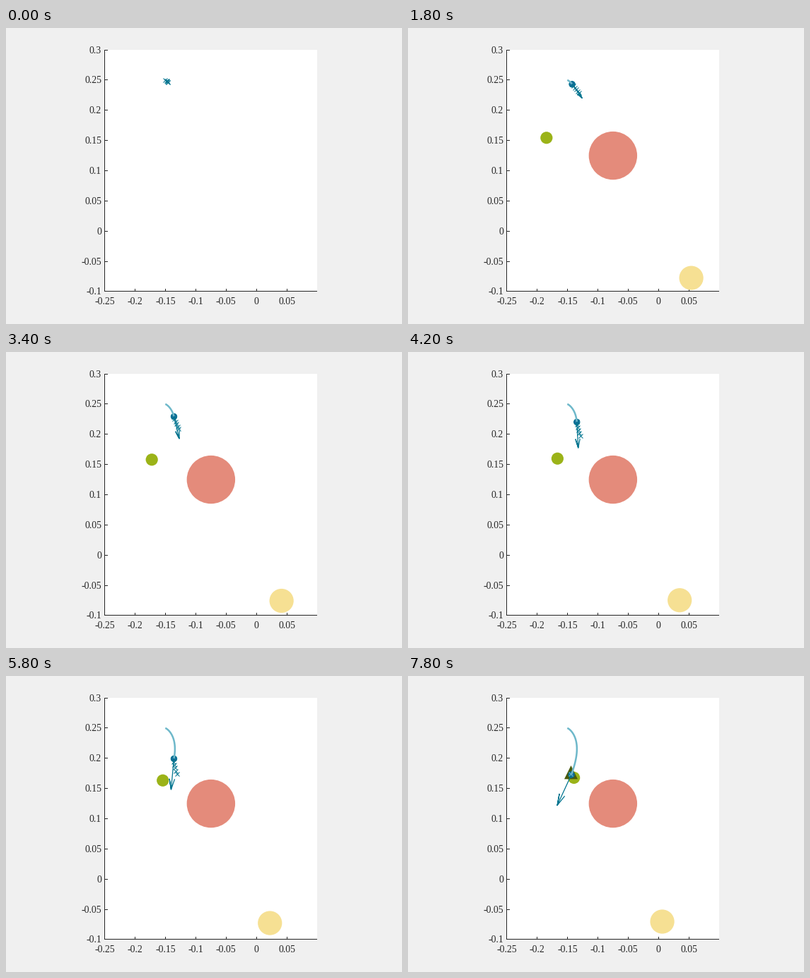
Animation, 560 px wide and 420 px high, one loop 8 s. Source, as a matplotlib script:

```python
import numpy as np
import matplotlib.pyplot as plt
from matplotlib.animation import FuncAnimation
from matplotlib.patches import Circle, Polygon, Rectangle

W, H, DPI = 560, 420, 100
PX = 72 / DPI                      # points per pixel
FRAMES, STEP = 40, 200
X0, Y0, UNIT = 139.8, 374.0, 857.5  # axis corner and pixels per data unit

TEAL, BLUE, TRAIL = "#00748f", "#17699c", "#6eb8ca"
RED, YELLOW, GREEN, OLIVE = "#e48b7b", "#f6e093", "#9bb318", "#4a5a0c"
INK = "#262626"

plt.rcParams["font.family"] = "Liberation Serif"
fig = plt.figure(figsize=(W / DPI, H / DPI), dpi=DPI, facecolor="#f0f0f0")
ax = fig.add_axes([0, 0, 1, 1])
ax.set_xlim(0, W)
ax.set_ylim(H, 0)
ax.axis("off")


def px(x):
    return X0 + (x + 0.25) * UNIT


def py(y):
    return Y0 - (y + 0.1) * UNIT


def box(x, y, w, h, color=INK, z=1):
    ax.add_patch(Rectangle((x, y), w, h, fc=color, ec="none", lw=0, aa=False, zorder=z))


def line(color, width=1.0, **kw):
    return ax.plot([], [], color=color, lw=width * PX, **kw)[0]


def disc(x, y, r, color, z):
    return ax.add_patch(Circle((x, y), r, fc=color, ec="none", zorder=z))


def draw_axes():
    box(139, 31, 301, 343, "white", 0)
    box(139, 31, 1, 343)
    box(139, 373, 301, 1)
    style = dict(size=13.75 * PX, color=INK, va="baseline")
    for i in range(-5, 2):
        x = px(i * 0.05)
        box(int(x), 370, 1, 4)
        ax.text(x, 392, f"{i * 0.05:.4g}", ha="center", **style)
    for i in range(-2, 7):
        y = min(int(py(i * 0.05)), 373)
        box(139, y, 5, 1)
        ax.text(135, y + 5, f"{i * 0.05:.4g}", ha="right", **style)


# Key times and the pixel quantities measured along the run
KEYS = [0, 5, 13, 21, 29, 33, 39]
FIT_X = np.polyfit(KEYS, [225.4, 228.5, 235.5, 238.5, 237.4, 235.4, 231], 4)
FIT_Y = np.polyfit(KEYS, [73.9, 76.1, 85, 99.4, 117.4, 126.8, 140], 4)
ARROW_X = [10, 15, 13, 2, -4, -13, -20]
ARROW_Y = [5, 13, 26, 36.5, 43.5, 43.2, 43.5]
PLAN_X = [4, 10.5, 9, 5, 5, 5, 5]
PLAN_Y = [3.5, 10, 15, 20, 21.5, 22, 22]
LAST_PLAN = 31


def head_at(k):
    return np.polyval(FIT_X, k), np.polyval(FIT_Y, k)


def arrow_at(k):
    return np.interp(k, KEYS, ARROW_X), np.interp(k, KEYS, ARROW_Y)


def plan_at(k):
    """Predicted positions from the head on, leaving along the heading and bending away."""
    hx, hy = head_at(k)
    ux, uy = arrow_at(k)
    ex, ey = np.interp(k, KEYS, PLAN_X), np.interp(k, KEYS, PLAN_Y)
    s = np.linspace(0, 1, 6)
    lead = ux * ey / uy
    return hx + lead * s + (ex - lead) * s**2, hy + ey * s


def arrow_path(k):
    x, y = head_at(k)
    u, v = arrow_at(k)
    tx, ty = x + u, y + v
    back, side = 0.33, 0.0825
    xs = [x, tx, tx - back * u - side * v, tx, tx - back * u + side * v]
    ys = [y, ty, ty - back * v + side * u, ty, ty - back * v - side * u]
    return xs, ys


draw_axes()
red = disc(px(-0.075), py(0.125), 34.2, RED, 2)
yellow = disc(0, 0, 17.1, YELLOW, 2)
green = disc(0, 0, 8.6, GREEN, 2)
alert = ax.add_patch(Polygon([(230.5, 127), (240, 146.3), (221, 146.3)],
                             fc=OLIVE, ec="none", zorder=3))
head = ax.add_patch(Circle((0, 0), 4.2, fc=BLUE, ec=TEAL, lw=PX, zorder=4))
plan = line(TEAL, ls="none", marker="x", ms=6 * PX, mew=PX, zorder=5)
trail = line(TRAIL, 2.5, zorder=6, solid_capstyle="butt")
arrow = line(TEAL, 1.25, zorder=7, solid_joinstyle="round")
cross = line(TRAIL, ls="none", marker="x", ms=6 * PX, mew=PX, zorder=8)
moving = [red, yellow, green, head, trail, arrow]


def draw(k):
    for part in moving:
        part.set_visible(k > 0)
    hit = k == FRAMES - 1
    alert.set_visible(hit)

    green.center = 184.2 + 1.294 * k, 159.2 - 0.38 * k
    yellow.center = 412.9 - 1.368 * k, 356.5 - 0.205 * k
    head.center = head_at(k)
    trail.set_data(*head_at(np.linspace(0, k, 4 * k + 2)))
    arrow.set_data(*arrow_path(k))
    plan.set_data(*(plan_at(k) if k <= LAST_PLAN else ([], [])))
    cross.set_data(*(([230.3], [138.5]) if hit else ([], [])))
    return moving + [alert, plan, cross]


anim = FuncAnimation(fig, draw, frames=FRAMES, interval=STEP,
                     init_func=lambda: draw(0), repeat=True, repeat_delay=0)
plt.show()
```
